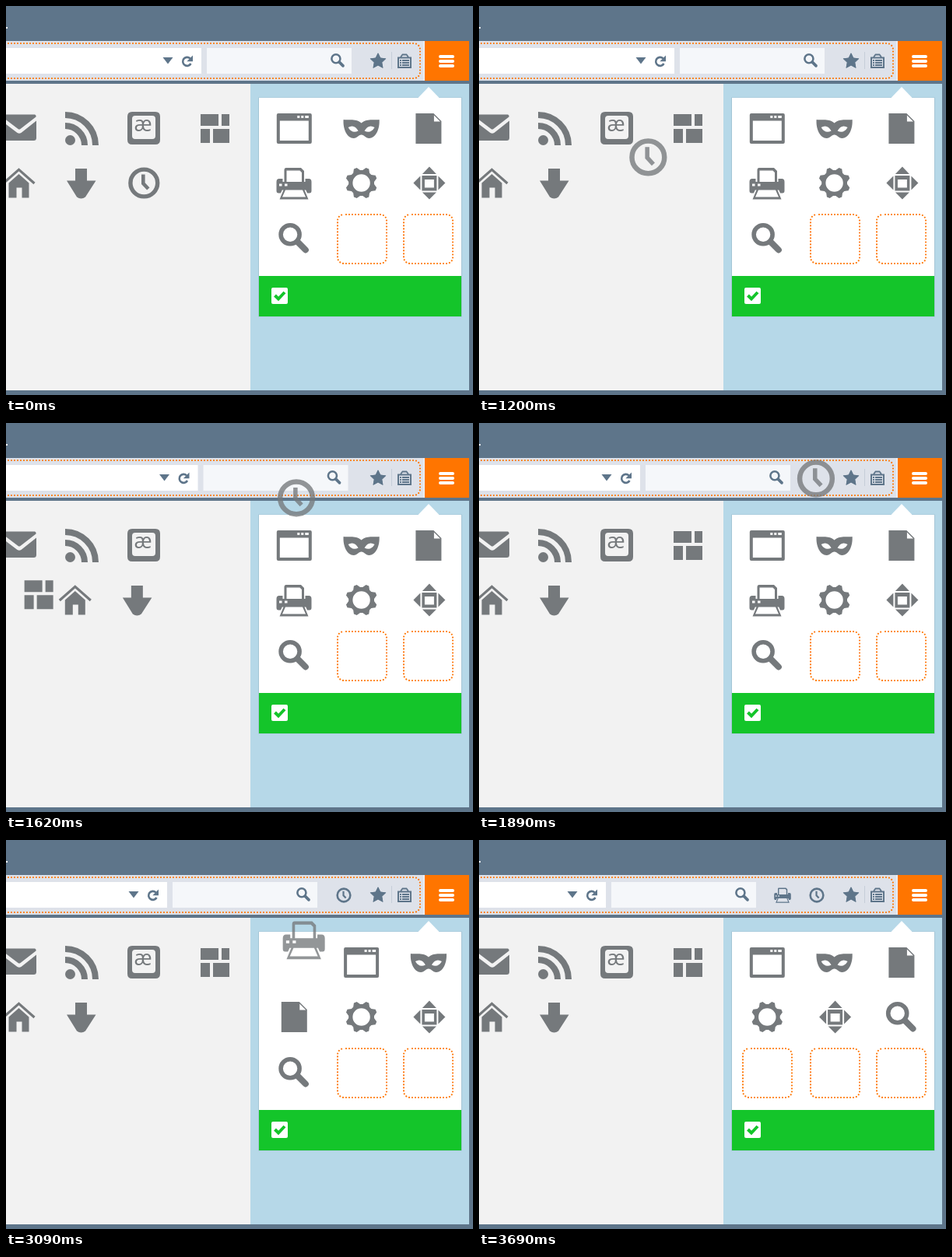
Recreate the animation shown at these times as an HTML page with a canvas. Size 600 px wide and 500 px high, loop 6500 ms.

```html
<!DOCTYPE html>
<html>
<head>
<meta charset="utf-8">
<style>
html, body { margin: 0; width: 100%; height: 100%; overflow: hidden; background: #5e758a; }
canvas { display: block; }
</style>
</head>
<body>
<canvas id="stage" width="600" height="500"></canvas>
<script>
const ctx = document.getElementById('stage').getContext('2d');
const LOOP = 6500, SLATE = '#5e758a', GREY = '#75797c', ORANGE = '#ff7500', GREEN = '#14c52a';

const clamp = x => Math.max(0, Math.min(1, x));
const lerp = (a, b, k) => a + (b - a) * k;
const mix = (p, q, k) => p.map((v, i) => lerp(v, q[i], k));
const ease = x => (1 - Math.cos(Math.PI * clamp(x))) / 2;
const slide = (t, start) => ease((t - start) / 150);

function polar(count, radiusAt, turn) {
  let d = '';
  for (let i = 0; i < count; i++) {
    const a = i / count * 2 * Math.PI + turn, r = radiusAt(i);
    d += (i ? 'L' : 'M') + (r * Math.cos(a)).toFixed(2) + ' ' + (r * Math.sin(a)).toFixed(2);
  }
  return d + 'Z';
}
const circle = (x, y, r) => `M${x + r} ${y}a${r} ${r} 0 1 0 ${-2 * r} 0a${r} ${r} 0 1 0 ${2 * r} 0Z`;
const box = (x, y, w, h) => `M${x} ${y}h${w}v${h}h${-w}Z`;

// Each icon is a list of [path, stroke width]; without a width the path is filled even-odd.
const ICONS = {
  mail: [['M-20.5 -17.5H20Q22 -17 21.5 -14.5L1.5 1Q0 2 -1.5 1L-22 -14.5ZM-23 -9.5L-2.5 6Q0 7.5 2.5 6L22 -9.5V12.5Q22 16 18.5 16H-19.5Q-23 16 -23 12.5Z']],
  feed: [[circle(-15, 15, 6.5)], ['M-21.5 -3.5A25 25 0 0 1 3.5 21.5M-21.5 -17.5A39 39 0 0 1 17.5 21.5', 8]],
  letter: [['M-15 -21.5H15Q21 -21.5 21 -15.5V14.5Q21 20.5 15 20.5H-15Q-21 20.5 -21 14.5V-15.5Q-21 -21.5 -15 -21.5Z' +
    'M-11 -16.5Q-15 -16.5 -15 -12.5V9.5Q-15 13.5 -11 13.5H11Q15 13.5 15 9.5V-12.5Q15 -16.5 11 -16.5Z']],
  blocks: [[box(-18.5, -18.5, 23, 15) + box(8.5, -18.5, 10, 15) + box(-18.5, .5, 12, 18) + box(-2.5, .5, 21, 18)]],
  home: [['M-20 0L0 -17.7L20 0', 3.2], ['M-13 -.5L0 -12L13 -.5V18.5H4V5.5H-3V18.5H-13Z']],
  arrow: [['M-8 -19H7V-3.5H18.5L5 17.5Q2.5 19.5 -.5 19.5Q-3.5 19.5 -6 17.5L-19 -3.5H-8Z']],
  clock: [[circle(0, 0, 17.4), 5.4], ['M-1 -11V.5L5.5 7.5', 4.6]],
  window: [['M-20.5 -19.5H20.5Q22.5 -19.5 22.5 -17.5V17.5Q22.5 19.5 20.5 19.5H-20.5Q-22.5 19.5 -22.5 17.5V-17.5Q-22.5 -19.5 -20.5 -19.5Z' +
    box(-18.5, -10, 37, 25.5) + box(4, -16.5, 3, 3) + box(9, -16.5, 3, 3) + box(14, -16.5, 4.5, 3)]],
  mask: [['M-23 -11.5C-18 -10 -8 -14 0 -7C8 -14 18 -10 23 -11.5C24 1 18 12.5 10 12.5C5 12.5 4 8 0 8C-4 8 -5 12.5 -10 12.5C-18 12.5 -24 1 -23 -11.5Z' +
    'M-17 -1.5Q-9 -6 -4 3Q-12 7 -17 -1.5ZM17 -1.5Q9 -6 4 3Q12 7 17 -1.5Z']],
  page: [['M-16.5 -19.5H6.5L16.5 -9.5V19.5H-16.5ZM7 -17V-9H15Z']],
  printer: [['M-22.5 -2Q-22.5 -6 -19 -6H-14.5V-2H14.5V-6H19Q22.5 -6 22.5 -2V9.5Q22.5 12.5 20 12.5H17L15.2 8.5H-15.2L-17 12.5H-20Q-22.5 12.5 -22.5 9.5Z' +
    box(-19, .5, 3.5, 3) + box(-12, .5, 3.5, 3) +
    'M-12.5 -2V-17Q-12.5 -20 -10 -20H9L13 -16V-2ZM-9.5 -2V-16.5H7.5L10 -14V-2Z' +
    'M-13.5 8.5L-18.5 20.5H18.5L13.5 8.5H11L15 17.5H-15L-11 8.5Z']],
  gear: [[polar(32, i => i % 4 < 2 ? 20.5 : 16.5, 3 * Math.PI / 32) + circle(0, 0, 11.2)]],
  move: [['M1 -21L10 -11.5H-8ZM1 21L10 12H-8ZM-19.5 0L-10.5 -9V9ZM21.5 0L12.5 -9V9Z' +
    box(-8.5, -9.5, 19, 19.5) + box(-5, -4.5, 12, 10.5)]],
  search: [[circle(-5.2, -4.8, 12), 5.6], ['M4.3 4.7L14.6 15', 8]],
  star: [[polar(10, i => i % 2 ? 5.2 : 11, -Math.PI / 2)], [polar(10, i => i % 2 ? 5 : 10, -Math.PI / 2), 1]],
  list: [['M-8 -4.5H8V8H-8Z', 2], ['M-4.5 -4.5V-6L-2.5 -8.5H2.5L4.5 -6V-4.5', 1.8], ['M-6 -1h2M-3 -1H6M-6 2h2M-3 2H6M-6 5h2M-3 5H6', 1.8]],
  reload: [['M4 -3.6A5.5 5.5 0 1 0 5 3', 2.6], ['M7.5 -7.5V.2H-.2Z']]
};
for (const parts of Object.values(ICONS)) parts.forEach(p => p[0] = new Path2D(p[0]));

function icon(name, [x, y], scale = 1, color = GREY, alpha = 1) {
  ctx.save();
  ctx.translate(x, y);
  ctx.scale(scale, scale);
  ctx.globalAlpha = alpha;
  ctx.fillStyle = ctx.strokeStyle = color;
  ctx.lineCap = name === 'search' ? 'round' : 'butt';
  for (const [path, width] of ICONS[name]) {
    if (width) {
      ctx.lineWidth = width;
      ctx.stroke(path);
    } else ctx.fill(path, 'evenodd');
  }
  if (name === 'letter') {
    ctx.font = '27px "Open Sans", sans-serif';
    ctx.textAlign = 'center';
    ctx.fillText('æ', -1, 3.5);
  }
  ctx.restore();
}

function rect(color, x, y, w, h, r = 0) {
  ctx.fillStyle = color;
  ctx.beginPath();
  ctx.roundRect(x, y, w, h, r);
  ctx.fill();
}

function poly(color, ...pts) {
  ctx.fillStyle = color;
  ctx.beginPath();
  pts.forEach(p => ctx.lineTo(...p));
  ctx.fill();
}

function dotted(x, y, w, h, r) {
  ctx.save();
  ctx.strokeStyle = ORANGE;
  ctx.lineWidth = 2.2;
  ctx.lineCap = 'round';
  ctx.setLineDash([0, 4]);
  ctx.lineDashOffset = 1;
  ctx.beginPath();
  ctx.roundRect(x, y, w, h, r);
  ctx.stroke();
  ctx.restore();
}

const PALETTE = [[17, 157], [97.5, 157.5], [177, 157.5], [268.5, 157.5], [16.5, 228], [97, 228], [177, 228]];
const PANEL = Array.from({ length: 9 }, (_, i) => [370.3 + i % 3 * 86.3, [157.5, 227.5, 298.5][i / 3 | 0]]);

// A fractional slot lies between two neighbouring places.
function slot(slots, s) {
  const i = Math.floor(s);
  return mix(slots[i], slots[Math.min(i + 1, slots.length - 1)], s - i);
}

function along(path, k, bend) {
  if (path.length < 3) return mix(path[0], path[1], k);
  return k < bend ? mix(path[0], path[1], k / bend) : mix(path[1], path[2], (k - bend) / (1 - bend));
}

function dragged(name, t, { path, bend, start, travel, end }) {
  if (t < start) return icon(name, path[0]);
  const drop = ease((t - end + 180) / 180);
  const rgb = mix([117, 121, 124], [94, 117, 138], drop).map(Math.round);
  icon(name, along(path, ease((t - start) / travel), bend),
    lerp(1.2, .48, drop), `rgb(${rgb})`, lerp(.78, 1, drop));
}

const CLOCK = { path: [[177.3, 227.5], [298.5, 127.3], [434, 71]], bend: .516, start: 930, travel: 1000, end: 2130 };
const PRINTER = { path: [[370, 228], [390, 71]], start: 2640, travel: 770, end: 3690 };

function toolbar(shift) {
  rect('#dee2ea', 0, 45, 538, 51);
  rect('#e9ecf1', 536, 45, 2, 51);
  rect('#fff', -20, 54, 271 - shift, 33);
  rect('#f5f7fa', 258 - shift, 54, 186, 33);
  poly(SLATE, [201.5 - shift, 66], [214.5 - shift, 66], [208 - shift, 74.5]);
  icon('reload', [232.5 - shift, 71], 1, SLATE);
  icon('search', [426.3 - shift, 70], .46, SLATE);
  icon('star', [478, 71], 1, SLATE);
  rect('#c6ced8', 495, 59, 1, 22);
  icon('list', [512, 71], 1, SLATE);
  dotted(-20, 48, 552, 45, 8);
  rect(ORANGE, 538, 45, 57, 51);
  for (const y of [63, 69, 75]) rect('#fff', 556, y, 20, 4, 2);
}

function panel() {
  rect('rgba(60,90,110,.15)', 324, 117.5, 262, 282);
  rect('#fff', 325, 118, 260, 229);
  poly('#fff', [529, 118.5], [543, 104], [557, 118.5]);
  rect(GREEN, 325, 347, 260, 52);
  rect('#fff', 341, 362, 21, 21, 2);
  ctx.strokeStyle = GREEN;
  ctx.lineWidth = 4;
  ctx.beginPath();
  ctx.moveTo(345.5, 372);
  ctx.lineTo(350, 376.5);
  ctx.lineTo(358, 368);
  ctx.stroke();
}

function draw(now) {
  const t = now % LOOP;
  const firstOut = slide(t, 1590), secondOut = slide(t, 3120);
  const paletteGap = slide(t, 1220) - firstOut;
  const panelGap = slide(t, 2890) - secondOut;

  rect(SLATE, 0, 0, 600, 500);
  rect('#fff', 0, 27, 2, 2);
  toolbar(44 * (firstOut + secondOut));
  rect('#f2f2f2', 0, 100, 314, 394);
  rect('#b6d8e8', 314, 100, 281, 394);
  panel();

  ['mail', 'feed', 'letter', 'blocks', 'home', 'arrow'].forEach((name, i) =>
    icon(name, slot(PALETTE, i < 3 ? i : i + paletteGap)));
  ['window', 'mask', 'page', '', 'gear', 'move', 'search'].forEach((name, i) => {
    if (name) icon(name, slot(PANEL, i < 3 ? i + panelGap : i - secondOut));
  });
  for (const x of [426, 511]) dotted(x, 268, 63, 63, 8);
  ctx.globalAlpha = secondOut;
  dotted(339, 268, 63, 63, 8);
  ctx.globalAlpha = 1;

  dragged('clock', t, CLOCK);
  dragged('printer', t, PRINTER);
}

function tick() {
  draw(performance.now());
  requestAnimationFrame(tick);
}
tick();
</script>
</body>
</html>
```
